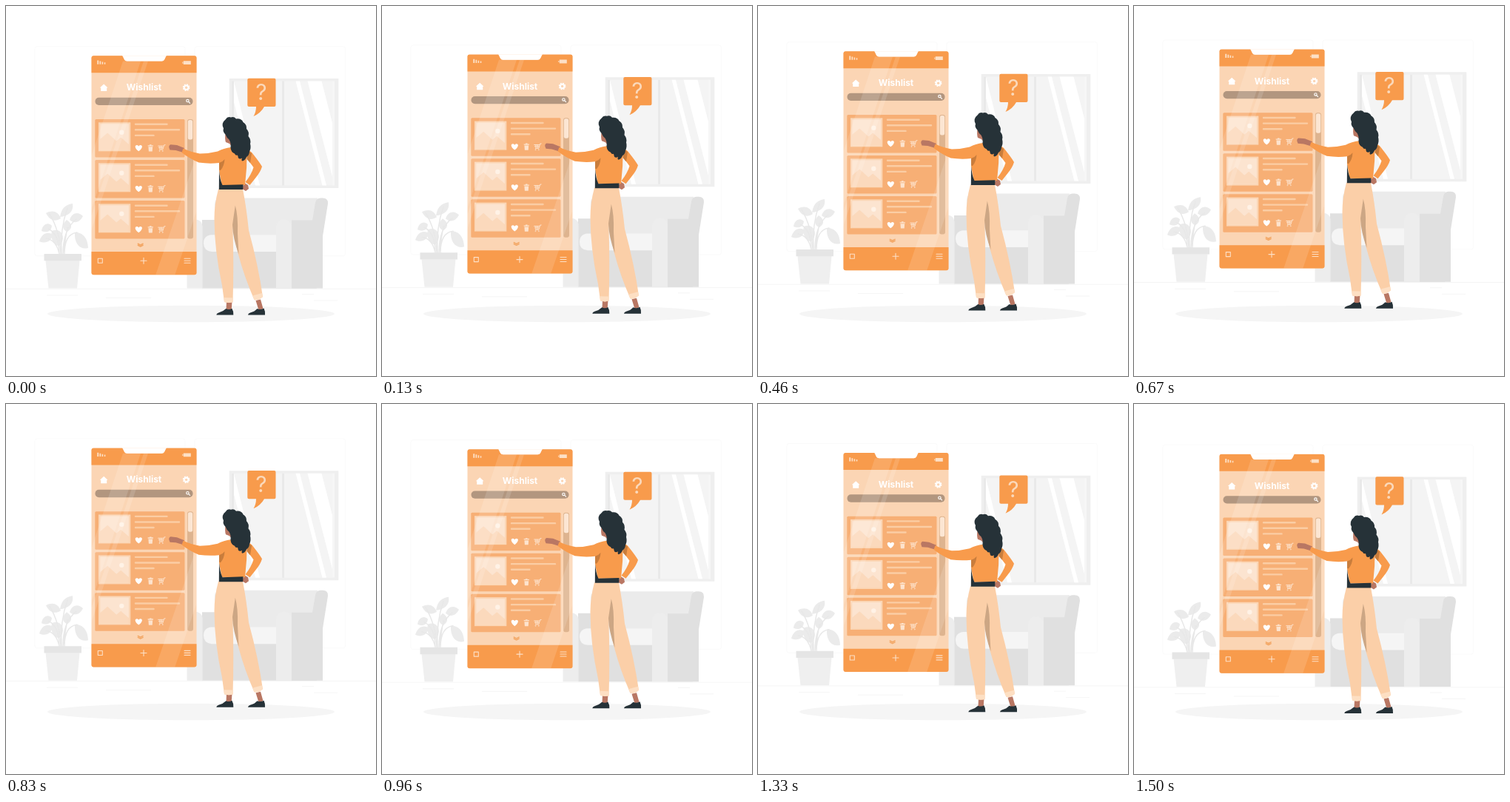
An HTML page that plays this animation: 500x500 px, repeating every 1540 ms.

```html
<!DOCTYPE html>
<html lang="en">
<head>
<meta charset="utf-8">
<title>Wishlist</title>
<style>
  html, body { margin: 0; width: 100%; height: 100%; overflow: hidden; background: #fff; }
  svg { display: block; width: 100%; height: 100%; }
  text { font-family: Inter, sans-serif; text-anchor: middle; }
  .line { fill: none; stroke-linecap: round; stroke-linejoin: round; }
</style>
</head>
<body>
<svg viewBox="0 0 500 500">
  <defs>
    <g id="card">
      <rect x="120.3" y="153" width="121.2" height="51.5" rx="1.5" fill="#f7af75"/>
      <rect x="125" y="157.3" width="43.3" height="39" fill="#fbd6b5"/>
      <rect x="127.2" y="159.3" width="38.8" height="35" fill="#fce4d0"/>
      <path d="M127.2 180l10-8.5 12 11 6-5 10.800 9.500V194.300H127.200z" fill="#fbd9bc"/>
      <circle cx="156.300" cy="170.700" r="3.200" fill="#fff2e6"/>
      <path class="line" d="M175 159.700h42.500M175 167.300h59M175 174.900h24.500" stroke="#fbcda4" stroke-width="2.400"/>
      <path d="M179.300 196.300c-6-4.300-5.300-8.300-2.500-8.300 1.500 0 2.300 1 2.500 1.700.2-.7 1-1.700 2.500-1.700 2.800 0 3.500 4-2.500 8.300z" fill="#fff"/>
      <path d="M192.400 190.300h5.800l-.5 6.200h-4.800zM191.700 188.200h7.200v1.300h-7.200zM194 187.300h2.600v1H194z" fill="#fde3cd"/>
      <g fill="none" stroke="#fde3cd" stroke-width="1">
        <path d="M215.500 187.700h-1.700l-2 6.300h-4.800M205.300 189.200h7.500M206 191.400h6.300M208 189.200v4.500M210.300 189.200v4.500"/>
        <circle cx="207.500" cy="195.900" r=".5"/><circle cx="211.800" cy="195.900" r=".5"/>
      </g>
    </g>
    <clipPath id="screen"><rect x="115.500" y="67.300" width="142" height="296" rx="3"/></clipPath>
  </defs>

  <ellipse cx="250" cy="416" rx="194" ry="11.300" fill="#f5f5f5"/>

  <g id="scene">
    <!-- room -->
    <g fill="none" stroke="#f8f8f8" stroke-width=".7">
      <rect x="39" y="54.700" width="203" height="283" rx="3"/>
      <rect x="255" y="54.700" width="203.500" height="283" rx="3"/>
      <path d="M0 382.300H500M55 391h42M135 394.500h61M400 389.500h16M416 398h32" stroke="#f1f1f1"/>
    </g>

    <!-- window -->
    <path d="M301.700 98h147.600v148H301.700z" fill="#efefef"/>
    <path d="M305 101.500h136v141H305z" fill="#f4f4f4"/>
    <path d="M391.500 101.500h5.500L433 242.500h-5.500zM407.500 101.500h19L441 158v73zM308 101.500L343 242.500h-6L308 130z" fill="#fff"/>
    <path d="M305 101.500h3v141h-3zM373 101.500h3v141h-3z" fill="#e9e9e9"/>
    <path d="M441 101.500h3v141h-3z" fill="#f6f6f6"/>

    <!-- sofa -->
    <path d="M265 289H420V381.500H265z" fill="#e0e0e0"/>
    <path d="M282 310V268q0-8.500 8-8.500H421L413 310z" fill="#ebebeb"/>
    <path d="M386 289.500h28L418 266q1-6.500 7-6.500h3q7.500 0 7 7.500L428 311V381.500H386z" fill="#e0e0e0"/>
    <path d="M278 309.300h90V332H278q-11-1-11-11.400t11-11.300z" fill="#f5f5f5"/>
    <path d="M244.500 381.500V297q1-8.500 10.500-8.500t10.500 8.500v84.500zM365 381.500V298q1-9.500 10.500-9.500T386 298v83.500z" fill="#ededed"/>

    <!-- plant -->
    <g fill="#ebebeb">
      <path d="M73 285c2-13 9-17 17-18 2 11-6 17-17 18zM54 280c9-5 17-2 20 7-9 6-16 1-20-7zM104 284c-7-7-15-4-18 5 7 6 14 3 18-5zM48 304c1-9 9-13 14-7-1 8-7 10-14 7zM45 318c3-11 12-14 18-9-2 9-9 13-18 9zM62 304c9-4 15 2 15 10-1 6-3 10-7 10-8-4-10-12-8-20zM82 289c-7 6-6 14 1 16 7-4 7-11-1-16zM93 306c11-1 18 9 18 21-11 3-19-6-18-21z"/>
      <path class="line" d="M75 335q-2-34 8-62M74 335q-1-30-15-54M77 335q0-33 18-47M72 335q0-27-15-34M72 335q-4-19-18-21M79 335q0-27 17-29M77 335l6-36" stroke="#e8e8e8" stroke-width="1.500"/>
    </g>
    <path d="M53.500 344h46l-3.500 37.500H57.500z" fill="#efefef"/>
    <path d="M51.500 335H102v9.300H51.500z" fill="#e5e5e5"/>

    <!-- phone -->
    <g clip-path="url(#screen)">
      <path d="M115 67h143v297H115z" fill="#fbd5b4"/>
      <path d="M115 67h42l3 5.500q1 2 3.500 2h47q2.500 0 3.500-2l3-5.500h41V90.300H115zM115 332h143v32H115z" fill="#f89b4c"/>
      <path d="M157.500 67h59l-2.500 5.500q-1 2-3.500 2h-47q-2.500 0-3.500-2z" fill="#fff"/>
    </g>
    <rect x="120.500" y="123.700" width="132" height="10.300" rx="5" fill="#b2967f"/>
    <rect x="245" y="153" width="8" height="161.500" rx="3" fill="#deb48f"/>
    <rect x="245.800" y="154" width="6.400" height="26.500" rx="2.500" fill="#fce6d3"/>
    <use href="#card"/>
    <use href="#card" y="55"/>
    <use href="#card" y="110"/>
    <g clip-path="url(#screen)" fill="#fff" opacity=".13">
      <path d="M158 74.500h24L115 276V204zM186 74.500h6L115 304v-19zM202 364h26l30-88V200z"/>
    </g>
    <text x="186.500" y="114.300" font-size="12" font-weight="700" fill="#fff">Wishlist</text>
    <g fill="#fff">
      <path d="M126.800 110.500l5.400-5 5.400 5h-1.400v4.500h-8v-4.500z"/>
      <path d="M123.300 73.500h1.900v5.300h-1.900zM126.500 74.500h1.700v4.300h-1.700zM129.600 75.500h1.600v3.300h-1.600zM132.800 76.300h1.500v2.500h-1.500zM239.800 74.300h10v4.800h-10zM238.300 75.600h1v2.200h-1z" fill="#fde0c6"/>
      <circle cx="243.600" cy="110.200" r="3.800"/>
    </g>
    <circle cx="243.600" cy="110.200" r="4.200" fill="none" stroke="#fff" stroke-width="1.300" stroke-dasharray="1.900 1.400"/>
    <circle cx="243.600" cy="110.200" r="1.700" fill="#fbd5b4"/>
    <g class="line" stroke="#fff" stroke-width="1.100">
      <circle cx="245.400" cy="128.100" r="1.700"/><path d="M246.800 129.500l1.800 1.800"/>
      <path d="M124.300 341.300h6v6h-6zM182 344.300h8M186 340.300v8M241 341.200h8M241 344.200h8M241 347.200h8" stroke="#fde0c6"/>
      <path d="M178.300 321.300l3.400 1.700 3.400-1.700M178.300 323.300l3.400 1.700 3.400-1.700" stroke="#f3a663" stroke-width="1.500"/>
    </g>

    <!-- speech bubble -->
    <path d="M328.300 97.800h34.200q2 0 2 2V134q0 2-2 2H349q-5 9-14.500 13 3.500-6 3.500-13h-9.700q-2 0-2-2V99.800q0-2 2-2z" fill="#f89b4c"/>
    <text x="345" y="127" font-size="30" fill="#fbd9bb">?</text>

    <!-- woman -->
    <g fill="#b97763">
      <path d="M298 399h7.500l-.8 12h-7.200zM337.500 398l6.500-1.500 3.500 12.500-6 2z"/>
      <path d="M241 192l-10-4-8.500-.8q-2.500.8-2.200 4l1.200 3.300 8 .6 10 3zM322 239l5 3 1 5-4 3-5-3z"/>
      <path d="M296.500 172q-1 8 .5 12l5 2 6 7v-22z"/>
    </g>
    <path d="M284.300 417.500q0-2 3-3 6-1.500 10-5.500 4 2 8-.3 2.500 4 2 8.800zM327 417.500q0-2 3-3 6-1.500 9.500-5.500 4.500 2 9-.5 2 4 1.500 9z" fill="#263238"/>
    <path d="M287 247.500q-5.500 20-5.500 40 0 42 10.500 90l3 22.500q6 2 11.500.3 1.500-50 0-98L310 268q-4 40 4 68 8 30 21.500 61 6 1 11.500-4-6-42-19-90-3-30-8-55.500z" fill="#fbcfa8"/>
    <path d="M309.800 269.500q4 14 3.200 38l1.500 28q-8-22-8.500-40z" fill="#cca684"/>
    <path d="M294.300 394l.7 6q6 2 11.500.3l.2-6zM333 391.500l2.500 5.500q6 1 11.500-4l-1-5z" fill="#fddfc3"/>
    <path d="M325.500 194q6 2 9 7 8 10 11.500 16-2 7-8.500 15l-8 10-6-4q8-10 11-20l-9-12z" fill="#f89b4c"/>
    <path d="M304 191q-10 1-18 5.500-12 3-24 3-12-2-22.500-7l-2 5.500q10 8 23 13.500 14 2 27.500.5 1 4 0 10l3.500 20H323q3-24 2.500-48z" fill="#f89b4c"/>
    <path d="M288 212q5-1.500 7.500-5-.5 9-5.500 15l-2-.5zM325.500 194l6.500 5-2 13-4.500-5z" fill="#c97d3c"/>
    <path d="M288 222q1 13 4.500 20l28-.8-.3 6.800H287.800z" fill="#263238"/>
    <path d="M297 153q2-4 7-2.500 4-1.500 7 2 7-1 9.500 4.500 5 3 4.500 9 4 4 2.500 10 4 5 2.500 10 1.500 6-1 11-.5 5-4 7-2 5-6 5.500-1-2 0-4-3 2-5 0l-1-4q-3 1-4-2-5-2-5.500-8 1-6-2-11-3-2-5-7-4-4-2.500-8-4-7 3-12.500z" fill="#263238"/>
  </g>
</svg>
<script>
  const period = 1540, phase = 52, height = 10, rest = 0.68;
  const scene = document.getElementById("scene");

  function frame(now) {
    const p = (now + phase) % period / period;
    const lift = height * (1 - Math.abs(1 - 2 * p));
    scene.setAttribute("transform", `translate(0 ${rest - lift})`);
    requestAnimationFrame(frame);
  }
  frame(0);
</script>
</body>
</html>
```
